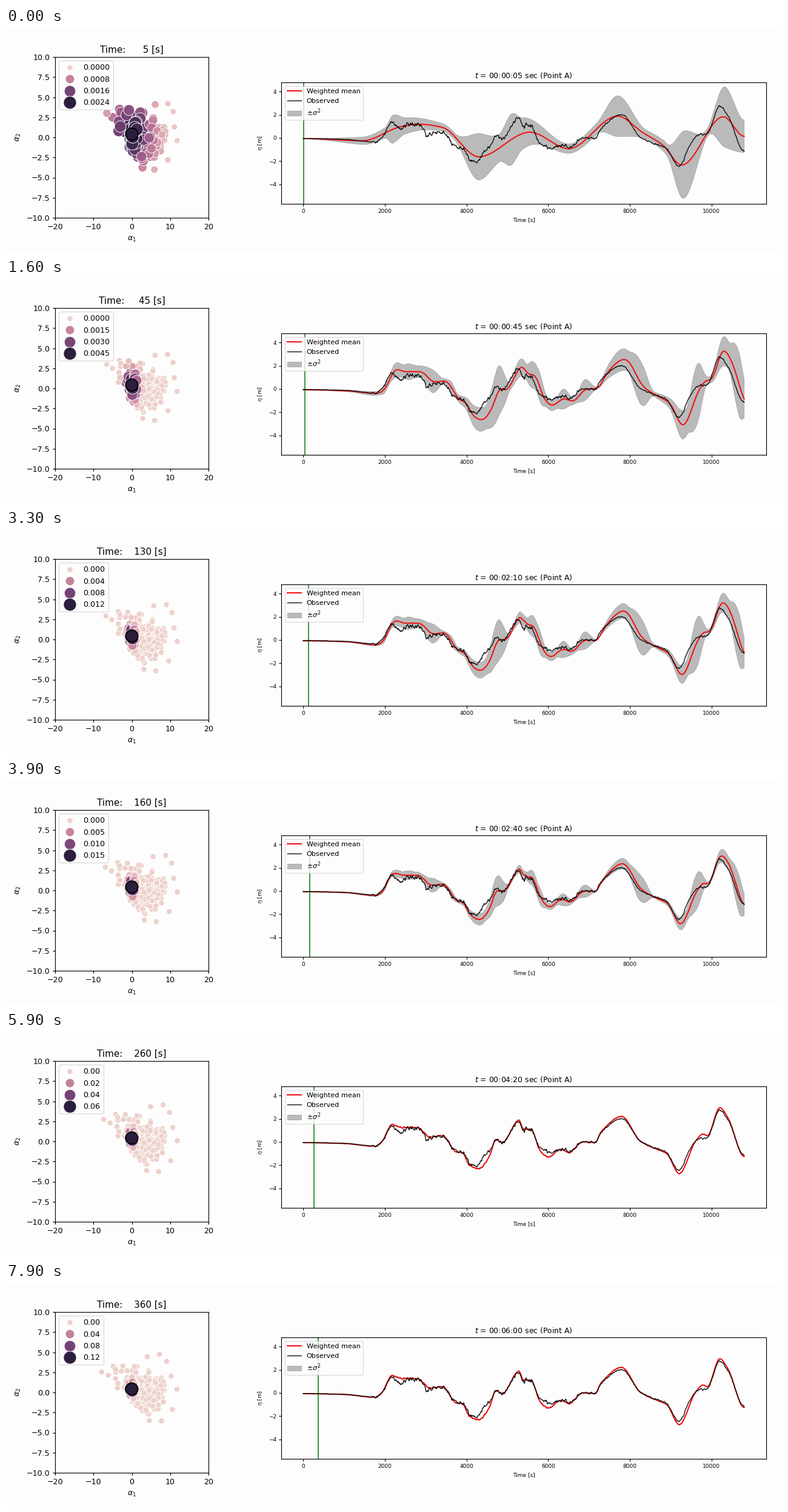
Animation, 1280 px wide and 369 px high, one loop 8000 ms. Source, as a matplotlib script:

```python
import numpy as np
import matplotlib.pyplot as plt
from matplotlib.animation import FuncAnimation
from matplotlib.lines import Line2D
from matplotlib.ticker import MaxNLocator

W, H, DPI = 1280, 369, 100
FRAMES, INTERVAL = 80, 100
PAPER = "#fdfdfd"
rng = np.random.default_rng(12)
sec = np.linspace(0, 10800, 1081)


def pt(px):
    """Pixels to points."""
    return px * 72 / DPI


# Waves
def trace(points):
    """Monotone cubic through (second, value) turning points."""
    x, y = np.array(points).T
    d = np.diff(y) / np.diff(x)
    slope = np.zeros(len(x))
    j = np.flatnonzero(d[:-1] * d[1:] > 0)
    slope[j + 1] = 2 * d[j] * d[j + 1] / (d[j] + d[j + 1])
    i = np.clip(np.searchsorted(x, sec, "right") - 1, 0, len(x) - 2)
    h = x[i + 1] - x[i]
    u = (sec - x[i]) / h
    s = u * u * (3 - 2 * u)
    return (y[i] * (1 - s) + y[i + 1] * s
            + h * u * (1 - u) * (slope[i] * (1 - u) - slope[i + 1] * u))


def bump(center, height, width):
    return height * np.exp(-((sec - center) / width) ** 2)


def smooth(v, width):
    """Gaussian average over a width in seconds."""
    n = int(width / 10) * 3
    k = np.exp(-0.5 * (np.arange(-n, n + 1) * 10 / width) ** 2)
    return np.convolve(np.pad(v, n, "edge"), k / k.sum(), "valid")


def delay(v, lag):
    return np.interp(sec - lag, sec, v)


def ripple(amp):
    """Short-scale roughness that starts with the first wave."""
    raw = np.convolve(rng.normal(size=sec.size), np.ones(3) / 3, "same")
    return amp * raw * np.interp(sec, [1500, 2100, 6000, 7500], [0.1, 1, 1, 0.4])


wave = trace([
    (0, -.06), (1000, -.13), (1750, -.37), (1900, -.1), (2180, 1.5),
    (2400, 1.25), (2800, 1.25), (3100, .43), (3400, .55), (3750, -.85),
    (3900, -.95), (4070, -2), (4300, -2.3), (4550, -1.3), (4720, .2),
    (4870, -.08), (5280, 1.85), (5400, 1.1), (5580, 1.1), (5800, -.75),
    (6000, -1.3), (6300, -.65), (6520, -.9), (6830, 0), (7150, -.05),
    (7300, .9), (7800, 2.2), (8250, .1), (8600, -.55), (8900, -1),
    (9210, -2.72), (9600, 0), (9790, .68), (9900, .55), (10200, 2.95),
    (10400, 2.1), (10800, -1.25)])
mean_first = trace([
    (0, -.05), (1450, -.24), (2400, .98), (2850, 1.18), (3400, .92),
    (4300, -1.62), (5550, .5), (6500, -.92), (7700, 1.88), (8300, .5),
    (8800, -.6), (9270, -2.33), (10290, 1.83), (10800, .15)])
spread_first = trace([
    (0, .03), (1500, .33), (2000, .45), (2200, 1.2), (2500, .7), (3700, .3),
    (4300, 2), (4800, 1.2), (5100, 2.2), (5350, 1.4), (6500, .4), (7200, .5),
    (7700, 1.75), (8400, .4), (8900, .5), (9320, 2.9), (9900, .35),
    (10330, 2.6), (10800, 1.4)])

# Halfway the waves are too tall and late; their tails are the least certain.
mean_mid = 1.23 * delay(smooth(wave, 60), 90)
tail = np.maximum(np.abs(delay(mean_mid, 260)) - np.abs(mean_mid), 0)
spread_mid = smooth(0.3 * np.abs(mean_mid) + tail, 40)

observed = 0.92 * wave + ripple(0.14) + sum(bump(*b) for b in (
    (2350, -.35, 130), (3030, -.4, 60), (4450, .7, 130), (5920, .45, 150),
    (9400, .4, 120), (9800, -.35, 90)))
wave += ripple(0.04)


def estimate(t):
    """Weighted mean and half-width of the band at time t."""
    a = np.interp(t, [5, 25, 45, 100], [1, 0.4, 0.12, 0])
    c = np.interp(t, [100, 160, 200], [0, 0.65, 1])
    b = max(1 - a - c, 0)
    mean = a * mean_first + b * mean_mid + c * wave
    return mean, np.maximum(a * spread_first + b**0.5 * spread_mid, 0.03)


# Particle cloud
STRETCH = 2.7
BEST = np.array([-0.1, 0.45])
RIM = [(9.4, 4.2), (10.8, 3.2), (11.1, 1.3), (11.8, -.4), (9.4, -2.8),
       (5.9, -4), (2.8, -3.75), (6.1, 4.1), (-3.2, 3.5), (-6.5, 3),
       (-5, 2.5), (-3.4, .8), (.7, 1.6)]


def make_cloud():
    ang = np.radians(rng.triangular(-82, -35, 145, 210))
    r = 9 * rng.random(210)
    fan = np.c_[r * np.cos(ang), r * np.sin(ang) / 2.6]
    y = rng.normal(0, 1.2, 70)
    column = np.c_[0.4 + 0.2 * y**2 + rng.normal(0, 0.4, 70), y]
    return rng.permutation(np.r_[fan, column, RIM])


cloud = make_cloud()


def drifted(t):
    """Slow elliptic rotation of the cloud."""
    ang = 0.18 * ((t - 5) / 355) ** 1.6
    x, y = cloud[:, 0], cloud[:, 1] * STRETCH
    c, s = np.cos(ang), np.sin(ang)
    return np.c_[c * x - s * y, (s * x + c * y) / STRETCH]


def rel_weight(xy, t):
    reach = np.array([6 * (t / 5) ** -0.55, 4.5 * (t / 5) ** -0.4])
    return np.exp(-(((xy - BEST) / reach) ** 2).sum(axis=1))


def top_weight(t):
    return np.exp(np.interp(t, [5, 45, 100, 160, 200, 260, 360],
                            np.log([.0022, .0042, .0086, .0145, .022, .055, .11])))


def tint(w):
    """Cubehelix ramp from pale pink to dark purple."""
    x = 0.85 - 0.7 * np.atleast_1d(np.clip(w, 0, 1))
    amp = 0.8 * x * (1 - x) / 2
    phi = 2 * np.pi * 0.4 * x
    rgb = [x + amp * (p * np.cos(phi) + q * np.sin(phi))
           for p, q in ((-.14861, 1.78277), (-.29227, -.90649), (1.97294, 0))]
    return np.clip(np.stack(rgb, axis=1), 0, 1)


def area(w):
    return 48 + 185 * np.clip(w, 0, 1)


# Layout
fig = plt.figure(figsize=(W / DPI, H / DPI), dpi=DPI, facecolor=PAPER)


def panel(x0, y0, x1, y1, unit, label_px):
    """Axes from pixel edges; unit is the pixel size of one style point."""
    ax = fig.add_axes([x0 / W, 1 - y1 / H, (x1 - x0) / W, (y1 - y0) / H],
                      facecolor=PAPER)
    ax.tick_params(length=pt(3.5 * unit), pad=pt(3.5 * unit),
                   width=pt(unit), labelsize=pt(label_px))
    for spine in ax.spines.values():
        spine.set_linewidth(pt(1.15))
    return ax


def note(x, y, text, px, angle=0):
    fig.text(x / W, 1 - y / H, text, fontsize=pt(px), rotation=angle,
             ha="center", va="center")


left = panel(81, 48, 334, 314, 1.26, 12.6)
left.set(xlim=(-20, 20), ylim=(-10, 10), xticks=range(-20, 21, 10),
         yticks=np.arange(-10, 10.1, 2.5))
note(207.5, 349, r"$\alpha_1$", 12.6)
note(20, 181, r"$\alpha_2$", 12.6, 90)

right = panel(454, 90, 1254, 291, 1.125, 9)
right.set(xlim=(-540, 11340), ylim=(-5.68, 4.79),
          xticks=range(0, 10001, 2000), yticks=range(-4, 5, 2))
note(854, 318, "Time [s]", 9)
note(420, 190.5, r"$\eta$ [m]", 9, 90)

left_title = left.set_title("", fontsize=pt(15.1), pad=pt(7.5))
right_title = right.set_title("", fontsize=pt(12.4), pad=pt(6.75))

dots = left.scatter(cloud[:, 0], cloud[:, 1], s=48, edgecolors="white",
                    linewidths=pt(0.9), zorder=3)
left.scatter(*BEST, s=pt(20) ** 2, facecolors=tint(1), edgecolors="black",
             linewidths=pt(2), zorder=4)

band, = right.fill([0, 1], [0, 1], facecolor="#bababa", edgecolor="#a4a4a4",
                   linewidth=pt(0.8), zorder=1, label=r"$\pm\sigma^2$")
mean_line, = right.plot([], [], color="#f01010", lw=pt(2), zorder=2,
                        label="Weighted mean")
obs_line, = right.plot(sec, observed, color="#0c0c0c", lw=pt(1.35), zorder=3,
                       label="Observed")
now_line = right.axvline(0, color="#1f861f", lw=pt(1.7), zorder=2.5)
right.legend(handles=[mean_line, obs_line, band], loc="upper left",
             fontsize=pt(11.25), facecolor=PAPER).get_frame().set_linewidth(pt(1))


def weight_legend(top):
    ticks = MaxNLocator(nbins=3).tick_values(0, top)
    step = ticks[1] - ticks[0]
    places = next((d for d in range(1, 6)
                   if abs(step * 10**d - round(step * 10**d)) < 1e-6), 6)
    handles = [Line2D([], [], ls="", marker="o", markersize=area(v / top) ** 0.5,
                      markerfacecolor=tint(v / top)[0], markeredgecolor="white",
                      markeredgewidth=pt(0.9), label=f"{v:.{places}f}")
               for v in ticks]
    box = left.legend(handles=handles, loc="upper left", fontsize=pt(12.6),
                      facecolor=PAPER)
    box.set_zorder(5)
    box.get_frame().set_linewidth(pt(1.1))


def draw(n):
    t = max(5, 5 * (n - 7))

    xy = drifted(t)
    w = rel_weight(xy, t)
    dots.set_offsets(xy)
    dots.set_sizes(area(w))
    dots.set_facecolors(tint(w))
    weight_legend(top_weight(t))
    left_title.set_text(f"Time: {t:6d} [s]")

    mean, half = estimate(t)
    mean_line.set_data(sec, mean)
    band.set_xy(np.c_[np.r_[sec, sec[::-1]],
                      np.r_[mean + half, (mean - half)[::-1]]])
    now_line.set_xdata([t, t])
    right_title.set_text(f"$t$ = 00:{t // 60:02d}:{t % 60:02d} sec (Point A)")
    return []


anim = FuncAnimation(fig, draw, frames=FRAMES, interval=INTERVAL,
                     init_func=lambda: draw(0), repeat=True, repeat_delay=0)
plt.show()
```
